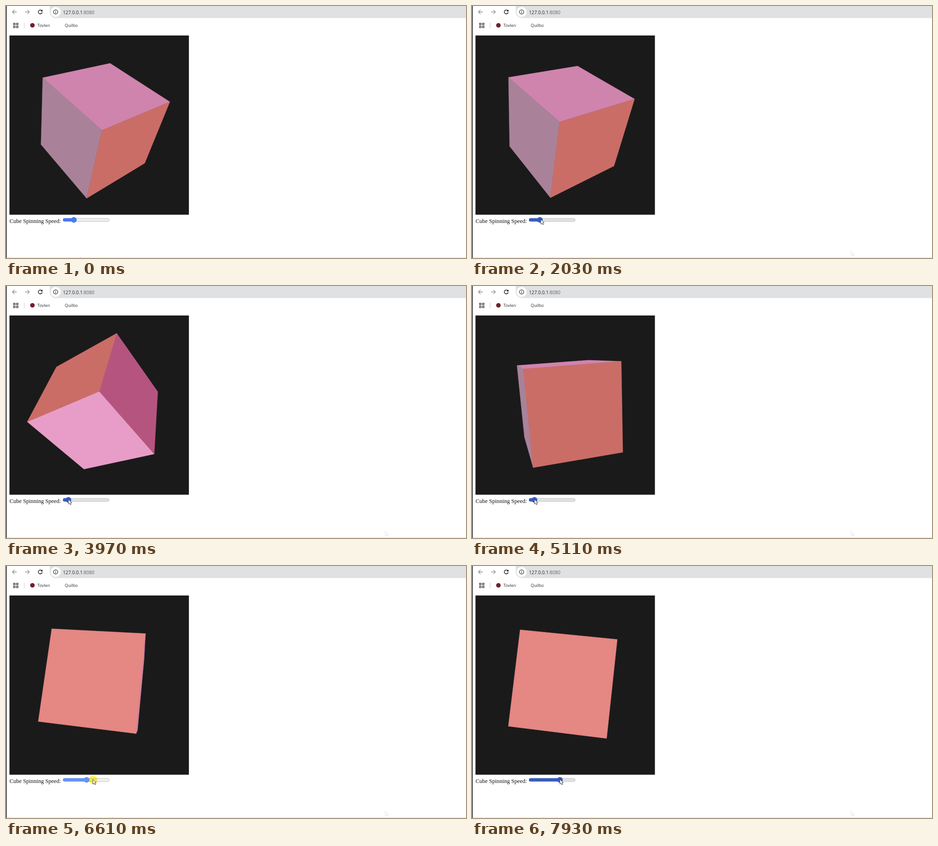
An HTML page for the animation above (8 s loop, 1010 by 554 pixels).

```html
<!DOCTYPE html>
<html lang="en">
<head>
<meta charset="utf-8">
<title>Spinning cube</title>
<style>
  html, body { margin: 0; width: 100%; height: 100%; overflow: hidden; background: #fff; }
  svg { display: block; width: 1010px; height: 554px; }
  .ui { font-family: "Open Sans", "Noto Sans", sans-serif; fill: #2b2b2b; }
  .line { fill: none; stroke-width: 1.3; }
  #glow { mix-blend-mode: multiply; }
</style>
</head>
<body>
<svg viewBox="0 0 1010 554">
  <defs>
    <path id="arrow" d="M0 0V10.4L2.4 8.3 4.2 12 6 11.2 4.4 7.6H7.6Z"/>
  </defs>

  <!-- browser bar -->
  <path d="M1010 0H96V13A13.5 13.5 0 0 0 109 26.500H1010Z" fill="#dfe1e3"/>
  <circle cx="109" cy="13" r="11" fill="#fff"/>
  <g class="line">
    <path d="M23.500 13H14M18.500 8.500 14 13 18.500 17.500" stroke="#8b8b8b"/>
    <path d="M42 13H51.500M47 8.500 51.500 13 47 17.500" stroke="#999"/>
    <path d="M78.600 10.300A4.300 4.300 0 1 0 79.500 13.600M79.500 8.500V11.300H76.500" stroke="#1f1f1f" stroke-width="1.5"/>
    <circle cx="109" cy="13" r="4.700" stroke="#333"/>
    <path d="M109 12.400V15.700M109 10.200V11.400" stroke="#333"/>
    <path d="M16.500 37.800h3.400v3.400h-3.400zM23 37.800h3.400v3.400H23zM16.500 44.200h3.400v3.400h-3.400zM23 44.200h3.400v3.400H23z" stroke="#2b2b2b"/>
    <path d="M40 37V48.500" stroke="#cfd2d6"/>
  </g>
  <text class="ui" x="125" y="17.500" font-size="10.2">127.0.0.1<tspan fill="#666">:8080</tspan></text>
  <circle cx="58" cy="42.500" r="5" fill="#741f2c"/>
  <text class="ui" x="69" y="46" font-size="9.2">Tovlen</text>
  <text class="ui" x="129" y="46" font-size="9.2">Quilbo</text>

  <!-- page -->
  <rect x="7.600" y="64.800" width="394" height="394" fill="#1a1a1a"/>
  <g id="cube" stroke-width=".6" stroke-linejoin="round"></g>
  <text x="7.800" y="476.800" font-size="12.6" fill="#111" font-family="'Liberation Serif', Times, serif">Cube Spinning Speed:</text>
  <rect id="track" x="125.500" y="467" width="101" height="6.400" rx="3.200" stroke="#b4b4b4" stroke-width=".9"/>
  <rect id="fill" x="125" y="466.600" height="7.200" rx="3.400"/>
  <circle id="thumb" cy="470.200" r="6.200"/>
  <rect width="1.400" height="554" fill="#111"/>
  <rect x="1" y="553" width="1009" height="1" fill="#dadada"/>

  <use id="ghost" href="#arrow" x="832.500" y="538.500" fill="#fff" stroke="#e3e3e3"/>
  <circle id="glow" r="9.300" cy="470" fill="#fff65c"/>
  <use id="cursor" href="#arrow" fill="#fff" stroke="#333" stroke-width=".9"/>
</svg>

<script>
const LOOP = 8000, RAD = Math.PI / 180;
const $ = id => document.getElementById(id);
const set = (id, attrs) => {
  for (const name in attrs) $(id).setAttribute(name, attrs[name]);
};
// 0 before a, 1 after b, linear between
const ramp = (t, a, b) => Math.min(1, Math.max(0, (t - a) / (b - a)));

// Start time and spin rate in degrees per second
const SPINS = [[0, 174], [2030, 189], [2990, 68.7], [6440, 339], [6610, 552]];
const START = 237.5;

// Rotate v about an axis (Rodrigues)
function turn(v, axis, deg) {
  const len = Math.hypot(...axis), [x, y, z] = axis.map(n => n / len);
  const c = Math.cos(deg * RAD), s = Math.sin(deg * RAD);
  const d = (x * v[0] + y * v[1] + z * v[2]) * (1 - c);
  return [
    v[0] * c + (y * v[2] - z * v[1]) * s + x * d,
    v[1] * c + (z * v[0] - x * v[2]) * s + y * d,
    v[2] * c + (x * v[1] - y * v[0]) * s + z * d
  ];
}

// Small x and y steps add up to a diagonal axis that leans with the rate
const spinAxis = rate => [1, 1, -rate * .000144];

const COLORS = ["#cf84ae", "#e89dc8", "#b5557f", "#a98299", "#e58783", "#cb6d67"]; // +x -x +y -y +z -z
const FOCAL = 197 / Math.tan(20 * RAD), DIST = 6;

const faces = COLORS.map((color, i) => {
  const el = document.createElementNS("http://www.w3.org/2000/svg", "polygon");
  el.setAttribute("fill", color);
  el.setAttribute("stroke", color);
  $("cube").append(el);
  return { el, axis: i >> 1, sign: i % 2 ? -1 : 1 };
});

const rest = [[1, 0, 0], [0, 1, 0], [0, 0, 1]]
  .map(v => turn(v, [0, 0, 1], -4.3))
  .map(v => turn(v, [1, -1, 0], 1.55))
  .map(v => turn(v, spinAxis(SPINS[0][1]), START));

function pose(t) {
  let basis = rest;
  SPINS.forEach(([from, rate], i) => {
    const end = i + 1 < SPINS.length ? SPINS[i + 1][0] : LOOP;
    const deg = rate * Math.max(0, Math.min(t, end) - from) / 1000;
    basis = basis.map(v => turn(v, spinAxis(rate), deg));
  });
  return basis;
}

function project([x, y, z]) {
  const k = FOCAL / (DIST - z);
  return (205 + x * k).toFixed(2) + "," + (262 - y * k).toFixed(2);
}

function drawCube(t) {
  const basis = pose(t);
  for (const { el, axis, sign } of faces) {
    const n = basis[axis], u = basis[(axis + 1) % 3], w = basis[(axis + 2) % 3];
    const seen = DIST * n[2] * sign > 1;
    el.style.display = seen ? "" : "none";
    if (!seen) continue;
    const corners = [[1, 1], [1, -1], [-1, -1], [-1, 1]]
      .map(([a, b]) => project(n.map((q, i) => q * sign + u[i] * a + w[i] * b)));
    el.setAttribute("points", corners.join(" "));
  }
}

// Two presses on the thumb: down and up, each with a short fade
const press = t =>
  ramp(t, 2740, 2820) - ramp(t, 3440, 3580) + ramp(t, 5800, 5880) - ramp(t, 6830, 6970);

function drawSlider(t) {
  const x = 149 - 12 * ramp(t, 2850, 3150) + 56 * ramp(t, 6440, 6680);
  const [blue, grey] = press(t) > .5 ? ["#6592f6", "#f3f3f3"]
    : t > 1500 ? ["#385cbe", "#e3e3e3"] : ["#467af2", "#efefef"];
  set("track", { fill: grey });
  set("fill", { fill: blue, width: x - 125 });
  set("thumb", { fill: blue, cx: x });
}

// The pointer swoops in below the stage edge, then drags the thumb twice
function drawPointer(t) {
  const u = 1 - (1 - ramp(t, 560, 1780)) ** 6;
  const x = 832 - 681 * u - 2 * ramp(t, 2030, 2800)
    - 12 * ramp(t, 2850, 3150) + 56 * ramp(t, 6400, 6620);
  const y = 539 - 70 * u + 520 * u * (1 - u);
  set("cursor", { transform: `translate(${x} ${y})`, opacity: t < 560 ? 0 : 1 });
  set("glow", { cx: x + .5, opacity: press(t) });
  set("ghost", { opacity: t < 560 ? 0 : 1 });
}

const begin = performance.now();
function frame() {
  const t = (performance.now() - begin) % LOOP;
  drawCube(t);
  drawSlider(t);
  drawPointer(t);
  requestAnimationFrame(frame);
}
frame();
</script>
</body>
</html>
```
